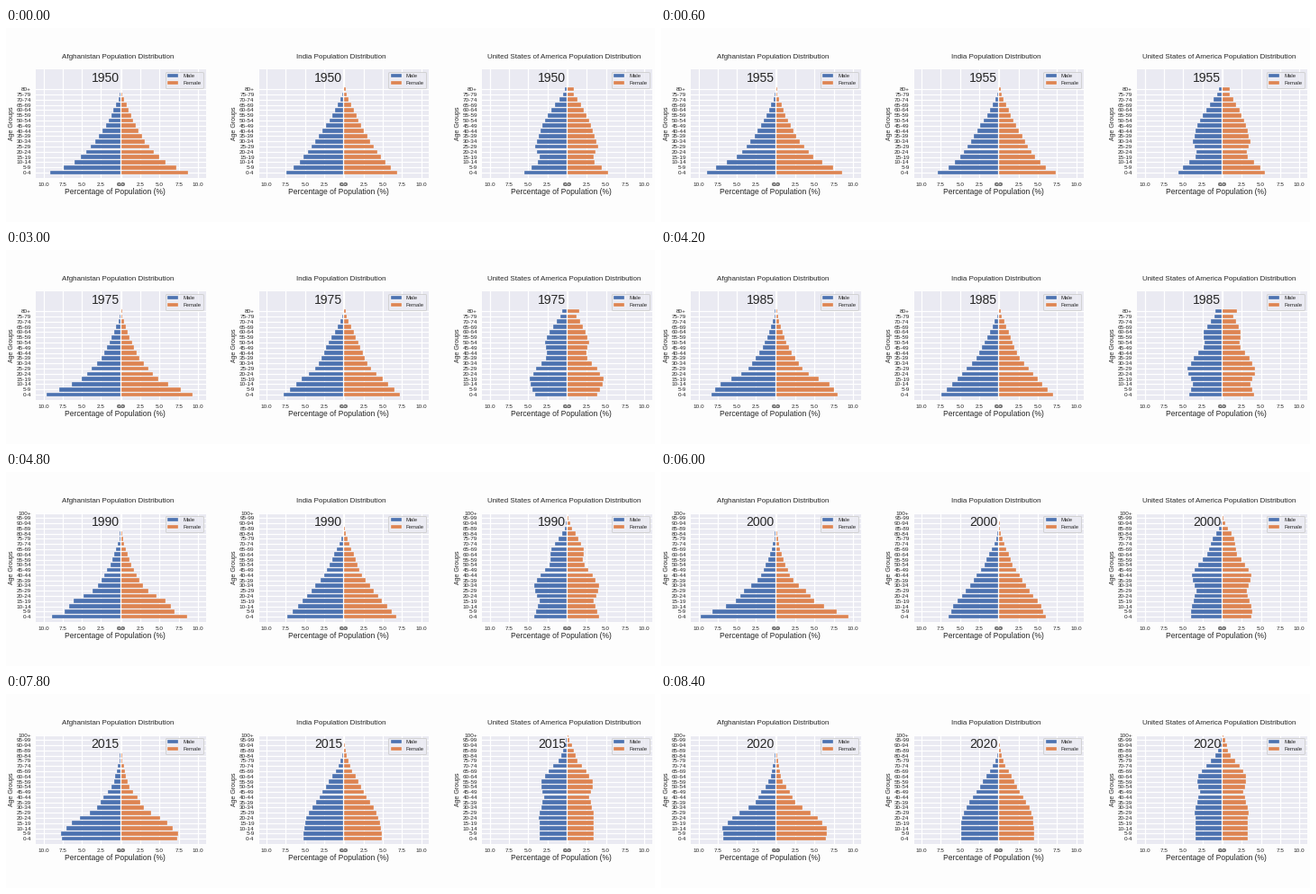
Animation of 720 by 216 pixels, one loop 9000 ms. Source, as a matplotlib script:

```python
import numpy as np
import matplotlib.pyplot as plt
from matplotlib.animation import FuncAnimation

W, H = 720, 216
BLUE, ORANGE, PANEL, INK = "#4c72b0", "#dd8452", "#eaeaf2", "#262626"
BOTTOM, TOP, HALF, LIMIT = 166.9, 45.5, 93.8, 11
YEARS = range(1950, 2021, 5)
AGES = np.arange(0, 105, 5)

plt.rcParams.update({
    "font.family": "Liberation Sans", "text.color": INK,
    "xtick.color": INK, "ytick.color": INK,
    "axes.facecolor": PANEL, "axes.axisbelow": True,
    "grid.color": "white", "grid.linewidth": 1.2,
})


class Country:
    """Population model: births per cohort, thinned by attrition and old age.

    births:    {birth year: boys born, in millions per five years}
    attrition: yearly loss for cohorts born by 1965 and from 1995 on
    lifespan:  men's typical age at death in 1950 and 2020
    girls:     girls born per boy
    extra:     years by which women outlive men
    """

    def __init__(self, name, births, attrition, lifespan, girls, extra):
        self.name, self.births, self.attrition = name, births, attrition
        self.lifespan, self.girls, self.extra = lifespan, girls, extra

    def shares(self, year):
        born = year - AGES
        boys = np.interp(born, list(self.births), list(self.births.values()))
        boys = boys * np.exp(-AGES * np.interp(born, [1965, 1995], self.attrition))
        life = np.interp(year, [1950, 2020], self.lifespan)
        men = boys * np.exp(-(AGES / life) ** 7.5)
        women = boys * self.girls * np.exp(-(AGES / (life + self.extra)) ** 7.5)
        scale = 100 / (men.sum() + women.sum())
        n = group_count(year)
        return [np.append(v[:n - 1], v[n - 1:].sum()) * scale for v in (men, women)]


COUNTRIES = [
    Country("Afghanistan",
            {1870: .28, 1900: .3, 1920: .41, 1940: .54, 1950: .7, 1960: .8,
             1975: 1.2, 1985: 1.25, 1990: 1.5, 2000: 2.2, 2010: 2.7, 2020: 2.65},
            (.0165, 0), (66, 74), .965, 4),
    Country("India",
            {1870: 8, 1900: 10, 1920: 15.7, 1940: 21.7, 1950: 26.5, 1960: 36.5,
             1975: 48, 1990: 61, 2000: 65, 2010: 66, 2020: 63.5},
            (.006, .003), (66, 74), .93, 5),
    Country("United States of America",
            {1870: 2.6, 1890: 4.1, 1910: 5.5, 1925: 6.5, 1935: 5.65, 1940: 5.9,
             1950: 8.75, 1960: 10.7, 1965: 10.5, 1975: 9, 1990: 10.8, 1995: 11,
             2020: 10.6},
            (0, 0), (72, 81.5), .97, 6),
]


def group_count(year):
    return 21 if year >= 1990 else 17


def age_labels(n):
    return [f"{a}-{a + 4}" for a in AGES[:n - 1]] + [f"{AGES[n - 1]}+"]


fig = plt.figure(figsize=(W / 72, H / 72), dpi=72, facecolor="#fdfdfd")


def put(x, y, text, size, **kw):
    return fig.text(x / W, 1 - y / H, text, size=size, ha="center",
                    va="center", zorder=5, **kw)


def half_axes(x, xlim, color):
    ax = fig.add_axes([x / W, 1 - BOTTOM / H, HALF / W, (BOTTOM - TOP) / H])
    ax.set(xlim=xlim, ylim=(-1, 19.9), xticks=np.arange(0, 10.1, 2.5))
    ax.tick_params(length=0, labelsize=6.4, pad=5)
    ax.grid(True)
    ax.spines[:].set_visible(False)
    bars = ax.barh(range(len(AGES)), np.zeros(len(AGES)), color=color,
                   edgecolor="white", linewidth=.3)
    return ax, bars


class Pyramid:
    def __init__(self, mid, country):
        self.country = country
        self.left, self.male = half_axes(mid - .5 - HALF, (LIMIT, 0), BLUE)
        self.right, self.female = half_axes(mid + .5, (0, LIMIT), ORANGE)
        self.right.legend([self.male, self.female], ["Male", "Female"], fontsize=6,
                          loc="upper right", facecolor=PANEL, edgecolor="#cccccc")
        put(mid - 3, 33, f"{country.name} Population Distribution", 8)
        put(mid - 6.3, 182.3, "Percentage of Population (%)", 8.5)
        put(mid - 121, 106, "Age Groups", 7, rotation=90)
        self.year = put(mid - 17, 56.3, "", 14)

    def show(self, year):
        n = group_count(year)
        self.left.set_yticks(range(n), age_labels(n))
        self.right.set_yticks(range(n), [""] * n)
        for bars, values in zip((self.male, self.female), self.country.shares(year)):
            for i, bar in enumerate(bars):
                bar.set_visible(i < n)
                bar.set_width(values[i] if i < n else 0)
        self.year.set_text(str(year))


pyramids = [Pyramid(127.3 + 247.55 * i, c) for i, c in enumerate(COUNTRIES)]


def draw(i):
    for p in pyramids:
        p.show(YEARS[i])
    return []


anim = FuncAnimation(fig, draw, frames=len(YEARS), init_func=lambda: [],
                     interval=600, repeat=True, repeat_delay=0)
plt.show()
```
